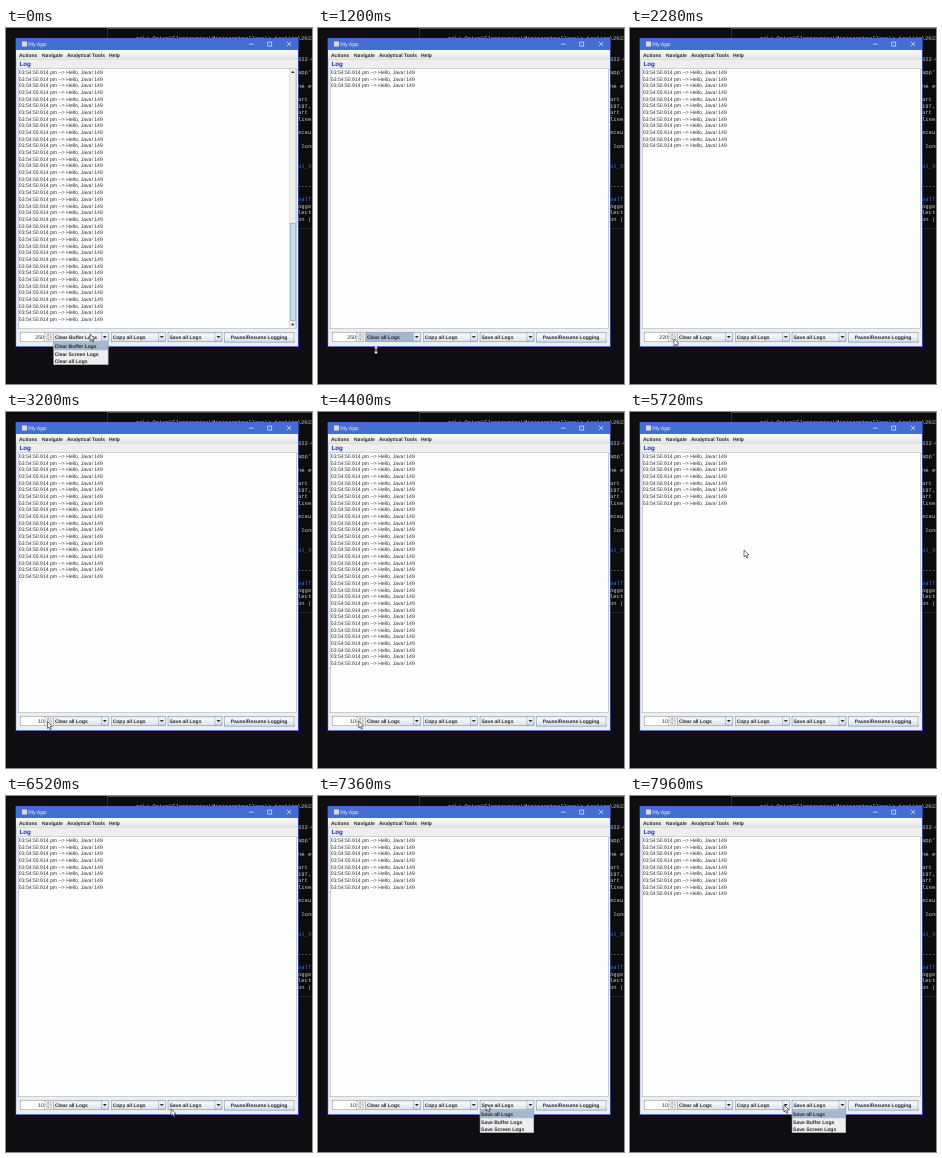
Write an HTML page with a canvas that moves like this. It is 306x356 px and loops after 8 s.

```html
<!DOCTYPE html>
<html lang="en">
<head>
<meta charset="utf-8">
<title>My App</title>
<style>
  html, body { margin: 0; width: 100%; height: 100%; overflow: hidden; background: #0e0d12; }
  canvas { display: block; width: 306px; height: 356px; }
</style>
</head>
<body>
<canvas id="stage"></canvas>
<script>
const W = 306, H = 356, LOOP = 8000;
const ROW = 6.68;
const BLUE = '#436cd4', PANEL = '#eeeeee', EDGE = '#7a8a99', PICK = '#a3b8cc', INK = '#26262a';
const SANS = '"Liberation Sans", Arial, sans-serif';
const MONO = '"Liberation Mono", "DejaVu Sans Mono", monospace';

const canvas = document.getElementById('stage');
const ctx = canvas.getContext('2d');
const dpr = window.devicePixelRatio || 1;
canvas.width = W * dpr;
canvas.height = H * dpr;

// Pointer path: time, x, y
const path = [
  [80, 84, 306], [400, 68, 322], [640, 58, 332], [960, 58, 332],
  [1200, 58, 322], [1320, 58, 321], [1680, 44, 311], [2680, 44, 311],
  [3440, 40.7, 309], [5080, 40.7, 309], [5440, 110, 90], [5700, 114, 138],
  [5880, 114, 138], [6500, 165, 313], [6720, 168, 308], [7380, 168, 308],
  [7500, 175, 333], [7640, 178, 333], [7940, 154, 309]
];

const consoleRows = [
  [31, '022-0'], [44, 'app\''], [57.5, 'he ev'], [71, 'art'], [77.5, '197,'],
  [84, 'art'], [91, 'line'], [104, 'ecau'], [117.5, ' long'], [137.5, 'ol_To', '#3b78d8'],
  [157.5, '-----'], [171, 'ealT', '#3b78d8'], [177.5, 'ogge'], [184, 'lect'], [191, 'on (']
];

function rect(x, y, w, h, fill) {
  ctx.fillStyle = fill;
  ctx.fillRect(x, y, w, h);
}

function frame(x, y, w, h, line, width = 0.5) {
  ctx.strokeStyle = line;
  ctx.lineWidth = width;
  ctx.strokeRect(x + width / 2, y + width / 2, w - width, h - width);
}

function text(str, x, y, { size = 5, bold = false, fill = INK, family = SANS, align = 'left' } = {}) {
  ctx.font = `${bold ? 'bold ' : ''}${size}px ${family}`;
  ctx.textAlign = align;
  ctx.fillStyle = fill;
  ctx.fillText(str, x, y);
}

function line(points, color, width) {
  ctx.strokeStyle = color;
  ctx.lineWidth = width;
  ctx.beginPath();
  points.forEach(([x, y]) => ctx.lineTo(x, y));
  ctx.stroke();
}

function shape(points, fill) {
  ctx.fillStyle = fill;
  ctx.beginPath();
  points.forEach(([x, y]) => ctx.lineTo(x, y));
  ctx.closePath();
  ctx.fill();
}

function triangle(x, y, w, h, fill = '#222') {
  shape([[x - w / 2, y - h / 2], [x + w / 2, y - h / 2], [x, y + h / 2]], fill);
}

function gradient(y, h, top, middle, bottom) {
  const g = ctx.createLinearGradient(0, y, 0, y + h);
  g.addColorStop(0, top);
  g.addColorStop(0.35, middle);
  g.addColorStop(1, bottom);
  return g;
}

function pointer(t) {
  if (t <= path[0][0]) return path[0].slice(1);
  for (let i = 1; i < path.length; i++) {
    const [t0, x0, y0] = path[i - 1], [t1, x1, y1] = path[i];
    if (t <= t1) {
      const p = (t - t0) / (t1 - t0), e = p * p * (3 - 2 * p);
      return [x0 + (x1 - x0) * e, y0 + (y1 - y0) * e];
    }
  }
  return path[path.length - 1].slice(1);
}

function lineCount(t) {
  if (t < 840) return 38;
  if (t < 960) return 0;
  if (t < 3520) return Math.min(23, Math.floor((t - 960) / 120) + 1);
  if (t < 4200) return Math.min(27, 24 + Math.floor((t - 3520) / 106));
  if (t < 4520) return t < 4280 ? 30 : t < 4400 ? 31 : 32;
  // The short buffer keeps filling and being trimmed
  const phase = (t - 4485) % 405;
  return 8 + Math.floor(phase / 135);
}

function bufferSize(t) {
  if (t < 1880) return 250;
  if (t < 2240) return 240;
  if (t < 2280) return 230;
  return Math.max(10, 220 - 10 * Math.floor((t - 2280) / 40));
}

function drawBackdrop() {
  rect(0, 0, W, H, '#0e0d12');
  rect(101, 0, 205, 201, '#0c0c0c');
  rect(101, 0, 205, 1, '#4a4a4e');
  rect(101, 0, 0.7, 201, '#3c3c40');
  rect(101, 200.3, 205, 0.7, '#303034');
  const style = { size: 5.5, family: MONO, fill: '#cccccc' };
  text('rs\\a Drive\\Electronics\\Microcontrollers\\c_testing\\2022-0', 130, 12, style);
  for (const [y, str, fill] of consoleRows)
    text(str, 292, y + 2, { ...style, fill: fill || style.fill });
}

function drawWindow() {
  rect(9.6, 10, 283, 308.8, BLUE);
  rect(10.2, 22, 281.8, 296.2, PANEL);
  rect(16, 13.5, 5, 5, '#d9dde8');
  text('My App', 22.2, 18.2, { size: 5.2, fill: '#fff', family: '"Open Sans", sans-serif' });
  line([[243, 16.2], [247.5, 16.2]], '#fff', 0.6);
  frame(261.5, 13.8, 4.6, 4.6, '#fff', 0.6);
  line([[280.8, 13.8], [285.2, 18.2]], '#fff', 0.6);
  line([[285.2, 13.8], [280.8, 18.2]], '#fff', 0.6);

  rect(10.2, 22, 281.8, 10, gradient(22, 10, '#fafafa', '#f2f2f2', '#dddddd'));
  [['Actions', 13], ['Navigate', 36], ['Analytical Tools', 61], ['Help', 103]]
    .forEach(([str, x]) => text(str, x, 29, { bold: true }));
  text('Log', 13.4, 38.2, { size: 6.2, bold: true, fill: '#1a2cb8' });
  rect(12, 40, 278.5, 261, '#fdfdfe');
  frame(12, 40, 278.5, 261, EDGE, 0.4);
}

function drawLog(count) {
  for (let i = 0; i < count; i++)
    text('03:54:50.914 pm --> Hello, Java! 149', 12.8, 45.9 + i * ROW, { size: 5.1, fill: '#303034' });
}

function drawScrollbar() {
  rect(283.6, 40.4, 6.4, 260, PANEL);
  frame(283.6, 40.4, 6.4, 260, '#b5bcc5', 0.4);
  rect(284, 195, 5.6, 98, '#c9dcf0');
  frame(284, 195, 5.6, 98, '#7f9fc4', 0.5);
  shape([[285, 45], [288.6, 45], [286.8, 42.8]], '#333');
  triangle(286.8, 296.8, 3.6, 2.2, '#333');
}

function drawCombo(x, w, label, focused) {
  rect(x, 304, w, 10, gradient(304, 10, '#e4e8ee', '#f4f6f8', '#d6dfe9'));
  if (focused) rect(x + 0.5, 304.5, w - 7.9, 9, PICK);
  rect(x + w - 7.4, 304, 7.4, 10, gradient(304, 10, '#dde8f3', '#f2f7fc', '#b8cfe5'));
  frame(x, 304, w, 10, EDGE);
  rect(x + w - 7.4, 304, 0.4, 10, EDGE);
  triangle(x + w - 3.7, 309, 4, 2.2);
  text(label, x + 1.7, 310.8, { bold: true });
}

function drawPopup(x, w, items, y) {
  const picked = Math.max(0, Math.min(2, Math.floor((y - 315) / 7.4)));
  rect(x, 314.4, w, 22.4, PANEL);
  rect(x, 314.8 + picked * 7.4, w, 7.4, PICK);
  items.forEach((str, i) => text(str, x + 1.2, 320.4 + i * 7.4, { bold: true }));
  frame(x, 314.4, w, 22.4, EDGE, 0.4);
}

function drawControls(t, y) {
  rect(14, 304, 31.3, 10, '#fff');
  rect(38.8, 304, 6.5, 10, PANEL);
  frame(14, 304, 31.3, 10, EDGE);
  rect(38.6, 304, 0.4, 10, EDGE);
  rect(38.6, 308.8, 6.7, 0.4, EDGE);
  shape([[40.9, 307.3], [43.3, 307.3], [42.1, 306]], '#555');
  triangle(42.1, 311.4, 2.4, 1.3, '#555');
  text(String(bufferSize(t)), 38, 310.9, { size: 5.2, align: 'right' });

  drawCombo(47.3, 55.2, t < 840 ? 'Clear Buffer Logs' : 'Clear all Logs', t >= 840 && t < 1840);
  drawCombo(105, 54.5, 'Copy all Logs');
  drawCombo(161.8, 54.4, 'Save all Logs');
  rect(218, 304, 70.3, 10.4, gradient(304, 10.4, '#e3ecf5', '#f8fafc', '#c4d5e6'));
  frame(218, 304, 70.3, 10.4, EDGE);
  text('Pause/Resume Logging', 253, 310.9, { bold: true, align: 'center' });

  if (t < 840)
    drawPopup(47.5, 54.8, ['Clear Buffer Logs', 'Clear Screen Logs', 'Clear all Logs'], y);
  if (t >= 6800)
    drawPopup(161.9, 54, ['Save all Logs', 'Save Buffer Logs', 'Save Screen Logs'], y);
}

function drawArrow(x, y) {
  const points = [[0, 0], [0, 7], [1.6, 5.6], [2.7, 8.2], [3.8, 7.7], [2.7, 5.2], [4.9, 5]]
    .map(([dx, dy]) => [x + dx, y + dy]);
  shape(points, '#fff');
  line([...points, points[0]], '#1a1a1a', 0.6);
}

function drawResize(x, y) {
  line([[x, y - 3], [x, y + 3]], '#fff', 0.8);
  shape([[x, y - 4], [x - 1.8, y - 1.8], [x + 1.8, y - 1.8]], '#fff');
  shape([[x, y + 4], [x - 1.8, y + 1.8], [x + 1.8, y + 1.8]], '#fff');
}

function draw(t) {
  ctx.setTransform(dpr, 0, 0, dpr, 0, 0);
  ctx.textRendering = 'geometricPrecision';
  const [x, y] = pointer(t);
  drawBackdrop();
  drawWindow();
  drawLog(lineCount(t));
  if (t < 840) drawScrollbar();
  drawControls(t, y);
  const onEdge = t > 960 && t < 1500 && y > 317 && y < 324;
  (onEdge ? drawResize : drawArrow)(x, y);
}

const start = performance.now();
function tick() {
  draw((performance.now() - start) % LOOP);
  requestAnimationFrame(tick);
}
tick();
</script>
</body>
</html>
```
